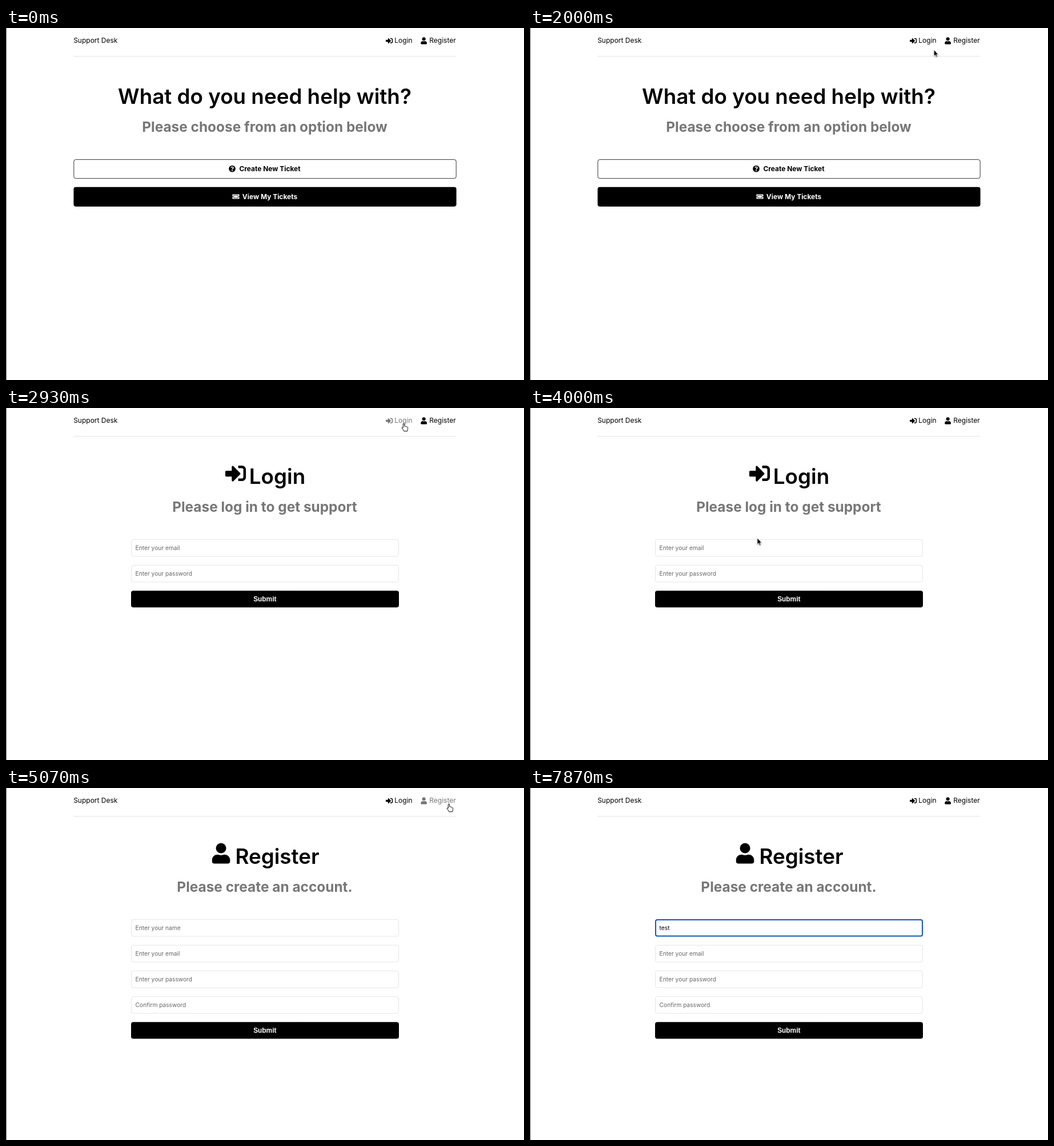
Write an HTML page that moves like this. It is 907 px wide and 617 px high and loops after 8 s.

```html
<!DOCTYPE html>
<html lang="en">
<head>
<meta charset="utf-8">
<title>Support Desk</title>
<style>
  html, body { margin: 0; width: 100%; height: 100%; overflow: hidden; background: #fff; }
  svg { display: block; width: 907px; height: 617px; font-family: Inter, sans-serif; font-optical-sizing: none; }
  .mid { text-anchor: middle; }
  .nav { font-size: 12px; }
  .title { font-size: 36.800px; font-weight: 600; }
  .sub { font-size: 24.400px; font-weight: 700; fill: #777; }
  .btn { font-size: 11.950px; font-weight: 700; }
  .submit { font: bold 11.900px "Liberation Sans", Arial, sans-serif; fill: #fff; }
  .field { font-size: 10.200px; fill: #666; }
  .box { fill: #fff; stroke: #e6e6e6; }
  .arrow { fill: #000; stroke: #fff; stroke-width: .8; filter: drop-shadow(0 1px 1px #0006); }
  .hand { fill: #fff; stroke: #000; stroke-width: .9; stroke-linejoin: round; }
  .beam { fill: none; stroke: #000; }
</style>
</head>
<body>
<svg viewBox="0 0 907 617">
  <defs>
    <path id="enter" d="M416 448h-84c-7 0-12-5-12-12v-40c0-7 5-12 12-12h84c18 0 32-14 32-32V160c0-18-14-32-32-32h-84c-7 0-12-5-12-12V76c0-7 5-12 12-12h84c53 0 96 43 96 96v192c0 53-43 96-96 96zm-47-201L201 79c-15-15-41-4.500-41 17v96H24c-13 0-24 11-24 24v96c0 13 11 24 24 24h136v96c0 21.500 26 32 41 17l168-168c9-9 9-25 0-34z"/>
    <g id="person">
      <circle cx="224" cy="128" r="128"/>
      <path d="M314 288h-17q-73 32-146 0h-17C60 288 0 348 0 422v42c0 27 21 48 48 48h352c27 0 48-21 48-48v-42c0-74-60-134-134-134z"/>
    </g>
    <g id="question">
      <circle cx="256" cy="256" r="248"/>
      <path d="M166 176Q208 108 262 122C346 132 366 204 300 238Q256 262 256 310" fill="none" stroke="#fff" stroke-width="66"/>
      <circle cx="256" cy="384" r="46" fill="#fff"/>
    </g>
    <path id="ticket" fill-rule="evenodd" d="M128 160h320v192H128zM528 256c0 27 21 48 48 48v96c0 27-21 48-48 48H48c-27 0-48-21-48-48v-96c27 0 48-21 48-48s-21-48-48-48v-96c0-27 21-48 48-48h480c27 0 48 21 48 48v96c-27 0-48 21-48 48zM480 152c0-13-11-24-24-24H120c-13 0-24 11-24 24v208c0 13 11 24 24 24h336c13 0 24-11 24-24z"/>
  </defs>

  <path d="M.5 0V617" stroke="#777"/>
  <path d="M118 49.500H788" stroke="#e6e6e6"/>
  <text class="nav mid" x="156.800" y="26.300">Support Desk</text>
  <g id="navLogin">
    <use href="#enter" transform="translate(665 16.200) scale(.0238)"/>
    <text class="nav mid" x="696" y="26.300">Login</text>
  </g>
  <g id="navRegister">
    <use href="#person" transform="translate(726.300 16.200) scale(.0238)"/>
    <text class="nav mid" x="764.500" y="26.300">Register</text>
  </g>

  <g id="home">
    <text class="title mid" x="453" y="132.500">What do you need help with?</text>
    <text class="sub mid" x="453" y="181.500">Please choose from an option below</text>
    <rect x="118.800" y="230.600" width="669.400" height="33.100" rx="3.500" fill="#fff" stroke="#000" stroke-width=".8"/>
    <use href="#question" transform="translate(390 240.700) scale(.0236)"/>
    <text class="btn mid" x="462" y="250.900">Create New Ticket</text>
    <rect x="118.400" y="278.700" width="670.200" height="34.200" rx="3.800"/>
    <g fill="#fff">
      <use href="#ticket" transform="translate(396.400 290.100) scale(.0212)"/>
      <text class="btn mid" x="462" y="299.700">View My Tickets</text>
    </g>
  </g>

  <g id="login">
    <use href="#enter" transform="translate(384 96.500) scale(.0705)"/>
    <text class="title mid" x="475" y="132.500">Login</text>
    <text class="sub mid" x="453" y="181.500">Please log in to get support</text>
  </g>

  <g id="register">
    <use href="#person" transform="translate(360.800 96.500) scale(.0703)"/>
    <text class="title mid" x="475" y="132.500">Register</text>
    <text class="sub mid" x="453" y="181.500">Please create an account.</text>
  </g>

  <g id="focus">
    <rect x="220" y="231" width="467" height="28.500" rx="3" fill="none" stroke="#0f59b8" stroke-width="2"/>
    <text id="typed" class="field" x="226.600" y="248.500" style="fill:#000"></text>
    <rect id="caret" y="238" width="1" height="14"/>
  </g>

  <g id="cursor">
    <path class="arrow" d="M0 0V11L2.500 8.800 4.200 12.600 6 11.800 4.400 8.200H7.600Z"/>
    <path class="hand" transform="translate(-.6 -.6) scale(1.080)" d="M-1 7.500V1.500a1.100 1.100 0 0 1 2.200 0V5.200c1.200-.5 2 0 2.200.5.9-.4 1.600 0 1.900.7.9-.2 1.400.4 1.400 1.200 0 2.600-.5 3-.9 5.600H.4C-.5 11-1.600 10-3 7.900-3.300 6.900-2 6.400-1 7.500Z"/>
    <path class="beam" d="M-2.500-6Q0-6 0-4.500V4.500Q0 6-2.500 6M2.500-6Q0-6 0-4.500M0 4.500Q0 6 2.500 6M-1.500 2H1.500"/>
  </g>
</svg>
<script>
const $ = id => document.getElementById(id);
const show = (el, on) => el.style.display = on ? "" : "none";
const clamp = v => Math.max(0, Math.min(1, v));

function addForm(page, labels) {
  const rows = labels.map((label, i) => `
    <rect class="box" x="219.500" y="${230.5 + 45 * i}" width="468" height="29.500" rx="3.500"/>
    <text class="field" x="226.600" y="${248.5 + 45 * i}">${label}</text>`);
  const y = 230 + 45 * labels.length;
  $(page).insertAdjacentHTML("beforeend", rows.join("") + `
    <rect x="219" y="${y + .2}" width="469" height="29.200" rx="4"/>
    <text class="submit mid" x="453.300" y="${y + 18.7}">Submit</text>`);
}
addForm("login", ["Enter your email", "Enter your password"]);
addForm("register", ["Enter your name", "Enter your email", "Enter your password", "Confirm password"]);
const namePlaceholder = document.querySelector("#register .field");
const [arrow, hand, beam] = $("cursor").children;

// Time runs in ticks of 1/15 s; a loop is 120 ticks.
const linear = u => u;
const out = u => 1 - (1 - u) ** 2;
const inOut = u => u * u * (3 - 2 * u);
const path = [
  [14, 906, 405], [26, 744, 63, out], [34, 695, 30, out],
  [36, 695, 30], [37, 697, 27], [48, 697, 27],
  [59, 397, 229, inOut], [60, 398, 228], [61, 398, 224], [62, 398, 224],
  [67, 814, 36, inOut], [69, 782, 30], [72, 776, 28], [76, 776, 28],
  [86, 442, 246, inOut], [90, 442, 246], [91, 442.5, 246]
];
const keystrokes = [99, 103, 106, 110];

function cursorAt(k) {
  const i = path.findIndex(p => p[0] >= k);
  if (i < 1) return path[i < 0 ? path.length - 1 : 0].slice(1, 3);
  const [k0, x0, y0] = path[i - 1], [k1, x1, y1, ease = linear] = path[i];
  const u = ease((k - k0) / (k1 - k0));
  return [x0 + (x1 - x0) * u, y0 + (y1 - y0) * u];
}

const within = (k, a, b) => k >= a && k < b;
const ramp = (k, start) => clamp((k - start + 1) / 5);
function fadeLink(id, k, enter, leave) {
  $(id).style.opacity = 1 - .467 * (ramp(k, enter) - ramp(k, leave));
}

function draw(ms) {
  const k = Math.floor((ms % 8000 + 4) * .015) % 120;
  show($("home"), k < 44);
  show($("login"), within(k, 44, 76));
  show($("register"), k >= 76);
  fadeLink("navLogin", k, 37, 50);
  fadeLink("navRegister", k, 68, 78);

  const count = keystrokes.filter(s => k >= s).length;
  show($("focus"), k >= 87);
  show(namePlaceholder, !count);
  $("typed").textContent = "test".slice(0, count);
  const width = count ? $("typed").getComputedTextLength() - .4 : 0;
  $("caret").setAttribute("x", Math.floor(227 + width));
  show($("caret"), within(k, 87, 95) || within(k, 99, 118));

  const [x, y] = cursorAt(k);
  const onLink = within(k, 37, 50) || within(k, 68, 78);
  const onField = k > 77 && y >= 230;
  show($("cursor"), within(k, 14, 99));
  show(arrow, !onLink && !onField);
  show(hand, onLink);
  show(beam, onField);
  $("cursor").setAttribute("transform", `translate(${x} ${y})`);
}

const start = performance.now();
function loop() {
  draw(performance.now() - start);
  requestAnimationFrame(loop);
}
loop();
</script>
</body>
</html>
```
